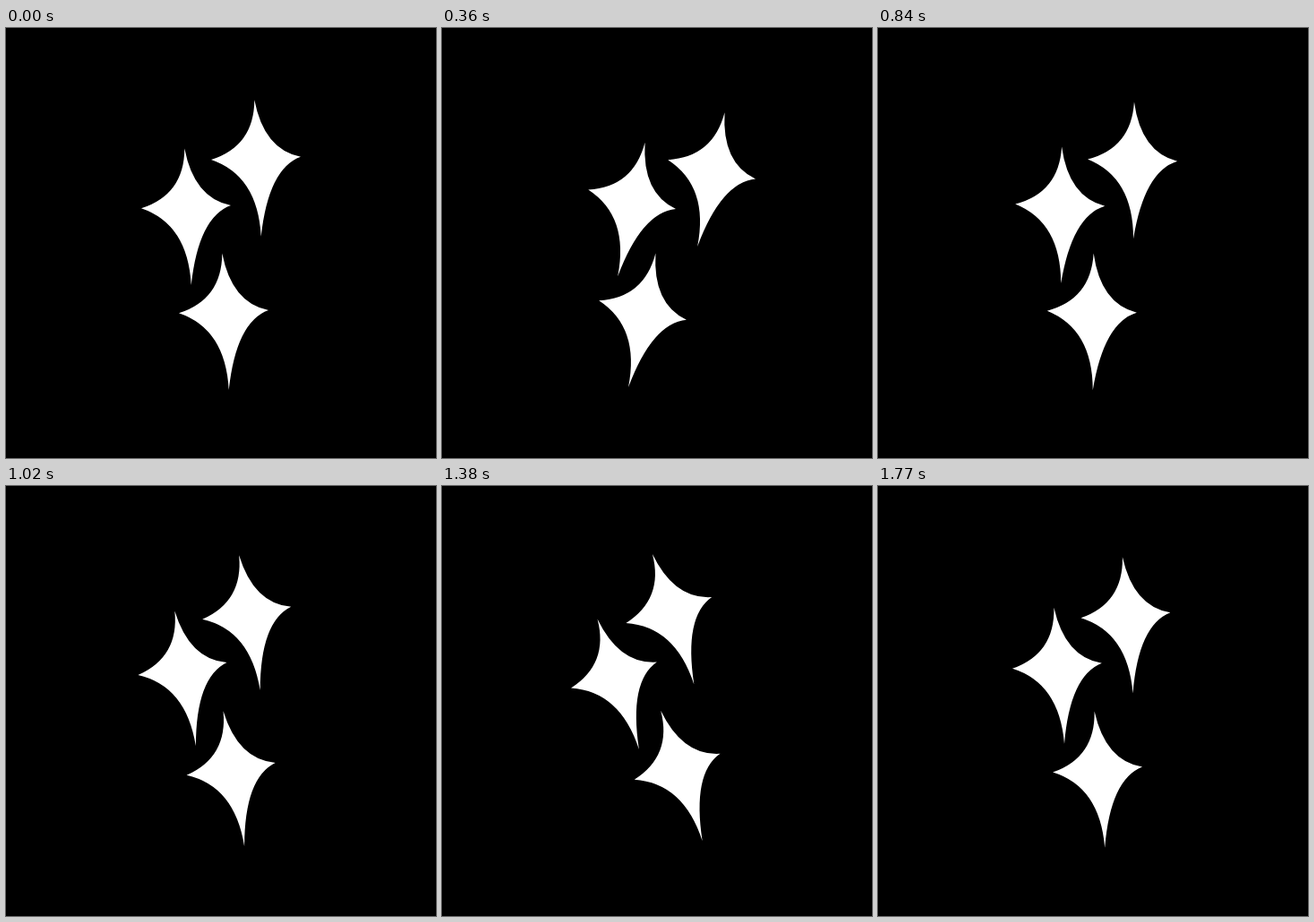
An HTML page that plays this animation: 480 px wide and 480 px high, repeating every 1800 ms.

```html
<!DOCTYPE html>
<html lang="en">
<head>
<meta charset="utf-8">
<title>Swinging sparkles</title>
<style>
  html, body { margin: 0; width: 100%; height: 100%; overflow: hidden; background: #000; }
  svg { display: block; width: 100vw; height: 100vh; }
</style>
</head>
<body>
<svg viewBox="0 0 480 480">
  <g id="sparkles" fill="#fff">
    <path id="star" d="M199.3 134.5Q210 190 251 198Q215 211 206.7 287Q203 219 151 201.3Q199 186 199.3 134.5Z"/>
    <use href="#star" x="78" y="-54.3"/>
    <use href="#star" x="42" y="117"/>
  </g>
</svg>
<script>
  const LOOP = 1800, STEP = 30, SWING = 15;
  const sparkles = document.getElementById('sparkles');
  const start = performance.now();

  function draw(now) {
    const time = Math.floor(Math.max(0, now - start) / STEP) * STEP % LOOP;
    const angle = SWING * Math.sin(2 * Math.PI * time / LOOP);
    sparkles.setAttribute('transform', `rotate(${angle} 240 240)`);
    requestAnimationFrame(draw);
  }
  draw(start);
</script>
</body>
</html>
```
